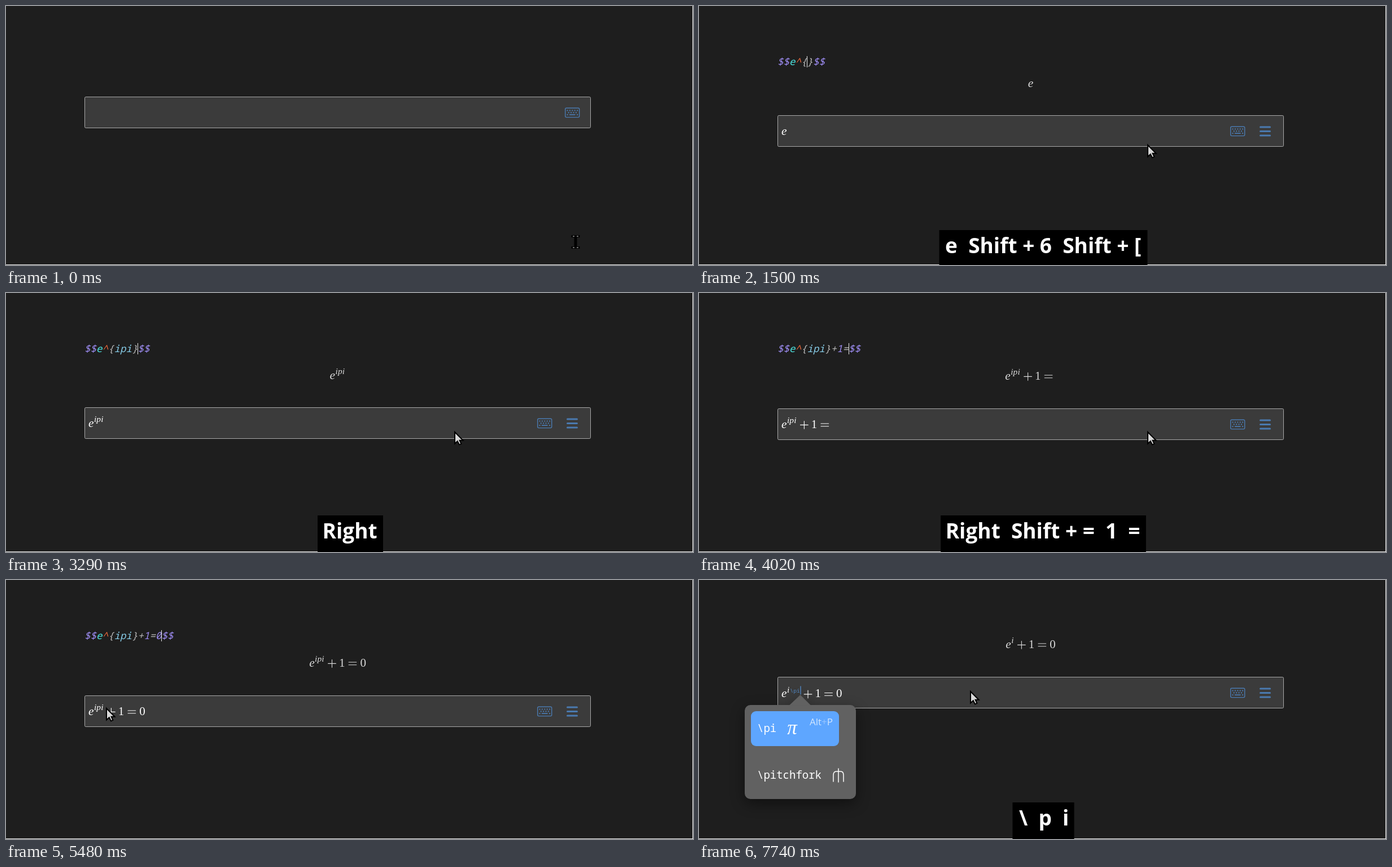
Animation of 1217x460 px, one loop 8000 ms. Source, as an HTML page:

```html
<!DOCTYPE html>
<html lang="en">
<head>
<meta charset="utf-8">
<title>Formula typing</title>
<style>
  html, body { margin: 0; width: 100%; height: 100%; overflow: hidden; background: #1e1e1e; }
  svg { display: block; }
  text { white-space: pre; }
  .mono { font-family: "Noto Sans Mono", "DejaVu Sans Mono", monospace; }
  .src { font-size: 17.5px; font-style: italic; }
  .math { font-family: "Liberation Serif", "Noto Serif", serif; text-anchor: middle; }
  .it { font-style: italic; }
  .keys { font: bold 37px "Open Sans", "Noto Sans", sans-serif; fill: #fff; }
  .hint { font: 17px "Open Sans", "Noto Sans", sans-serif; fill: #d3e7ff; }
</style>
</head>
<body>
<svg width="1217" height="460" viewBox="0 0 1217 460">
  <rect width="1217" height="460" fill="#1e1e1e"/>
  <path d="M1216.5 0V460M0 459.5H1217" stroke="#eee"/>
  <rect id="hover" x="138.5" y="80.5" width="898" height="177" rx="3" fill="none" stroke="#3a3a3a"/>
  <g id="scene"></g>
  <g id="arrow">
    <path d="M0 0V20.5L4.8 16.2L8 22.4L11.4 20.8L8.6 14.8H14.6Z" fill="#d9d9d9" stroke="#000" stroke-width="2"/>
  </g>
  <g id="beam">
    <path d="M-7.500-12H7.500V-8H2.500V8H7.500V12H-7.500V8H-2.500V-8H-7.500Z" fill="#000"/>
    <path d="M-5-10H-2M2-10H5M-5 10H-2M2 10H5" stroke="#ddd" stroke-width="1.2"/>
  </g>
</svg>
<script>
const LOOP = 8000;
const EM = 20.5;
const CELL = 10.5;
const BLUE = '#4a7ab0';
const $ = id => document.getElementById(id);

// [time, changes]; each step keeps what the one before it set
const STEPS = [
  [0, { src: '', cmd: '', open: false, caret: -1, keys: '', popup: false }],
  [700, { open: true, caret: 2 }],
  [900, { src: 'e', caret: 3, keys: 'e' }],
  [1290, { src: 'e^', caret: 4, keys: 'e  Shift + 6' }],
  [1500, { src: 'e^{}', caret: 5, keys: 'e  Shift + 6  Shift + [' }],
  [1700, { caret: 6, keys: 'e  Shift + 6  Shift + [  Shift + ]' }],
  [1830, { caret: 5, keys: 'e  Shift + 6  Shift + [  Shift + ]  Left' }],
  [2030, { src: 'e^{i}', caret: 6, keys: 'Shift + 6  Shift + [  Shift + ]  Left  i' }],
  [2160, { keys: 'Shift + [  Shift + ]  Left  i' }],
  [2290, { src: 'e^{ip}', caret: 7, keys: 'Shift + ]  Left  i  p' }],
  [2420, { src: 'e^{ipi}', caret: 8, keys: 'Left  i  p  i' }],
  [2620, { keys: 'i  p  i' }],
  [2880, { caret: -1, keys: 'p  i' }],
  [2950, { keys: 'i' }],
  [3220, { caret: 9, keys: 'i  Right' }],
  [3290, { keys: 'Right' }],
  [3560, { src: 'e^{ipi}+', caret: 10, keys: 'Right  Shift + =' }],
  [3820, { src: 'e^{ipi}+1', caret: 11, keys: 'Right  Shift + =  1' }],
  [4020, { src: 'e^{ipi}+1=', caret: 12, keys: 'Right  Shift + =  1  =' }],
  [4150, { keys: 'Shift + =  1  =' }],
  [4280, { src: 'e^{ipi}+1=0', caret: 13, keys: 'Shift + =  1  =  0' }],
  [4480, { keys: '1  =  0' }],
  [4750, { keys: '= 0'.replace(' ', '  ') }],
  [4950, { keys: '0' }],
  [5150, { keys: '' }],
  [5550, { open: false }],
  [6320, { src: 'e^{ip}+1=0', keys: 'Backspace' }],
  [6530, { src: 'e^{i}+1=0' }],
  [7060, { cmd: '\\', keys: 'Backspace  \\' }],
  [7460, { keys: '\\' }],
  [7600, { cmd: '\\p', keys: '\\  p' }],
  [7670, { cmd: '\\pi', keys: '\\  p  i' }],
  [7740, { popup: true }]
];
const states = [];
for (const [time, change] of STEPS) states.push({ ...states.at(-1), ...change, time });

// [time, x, y] of the pointer
const MOUSE = [
  [70, 1009, 419], [700, 795, 247], [4749, 795, 247], [4750, 785, 245],
  [5250, 118, 230], [5480, 178, 228], [5620, 178, 228], [6390, 481, 198]
];

const glyph = (ch, x, y, size, color, italic) =>
  `<text class="math ${italic ? 'it' : ''}" x="${x}" y="${y}" font-size="${size}" fill="${color}">${ch}</text>`;

const line = (d, color, width = 1) =>
  `<path d="${d}" stroke="${color}" stroke-width="${width}" fill="none" stroke-linecap="round"/>`;

// Typesets the formula from x; returns markup, width and the end of the exponent
function formula(state, x, y, color, cmd = '') {
  const start = x;
  let out = '';
  if (!state.src) return { out, width: 0, supEnd: x };
  const sup = (state.src.match(/\{(\w*)\}/) || [, ''])[1];
  const tail = state.src.split('}')[1] || '';
  out += glyph('e', x + 0.233 * EM, y, EM + 1, color, true);
  x += 0.466 * EM;
  for (const ch of sup) {
    const w = (ch === 'p' ? 0.503 : 0.345) * 0.707 * EM;
    out += glyph(ch, x + w / 2, y - 8.5, 15.5, color, true);
    x += w;
  }
  if (cmd) {
    out += `<text class="mono" x="${x + 0.8}" y="${y - 8.5}" font-size="9.7" fill="#5288c4">${cmd}</text>`;
    x += cmd.length * 5.82 + 1.5;
  }
  const supEnd = x;
  if (sup) x += 1;
  const axis = y - 0.25 * EM;
  for (const ch of tail) {
    if (ch === '+' || ch === '=') {
      const gap = (ch === '+' ? 0.222 : 0.278) * EM, arm = 0.335 * EM;
      const mid = x + gap + 0.389 * EM;
      const bar = v => `M${mid - arm} ${v}h${2 * arm}`;
      out += line(ch === '+' ? bar(axis) + `M${mid} ${axis - arm}v${2 * arm}`
                             : bar(axis - 2.4) + bar(axis + 2.4), color, 1.1);
      x += 2 * gap + 0.778 * EM;
    } else {
      out += glyph(ch, x + 0.25 * EM, y, EM + 0.5, color);
      x += 0.5 * EM;
    }
  }
  return { out, width: x - start, supEnd };
}

function source(state) {
  const tint = (ch, i) =>
    /[$\d]/.test(ch) ? '#9d8cf2' : ch === '^' ? '#f06a3c' :
    /[{}+=]/.test(ch) ? '#b4b4b4' : i === 2 ? '#4de0dc' : '#86cbe6';
  const spans = [...`$$${state.src}$$`].map((ch, i) => `<tspan fill="${tint(ch, i)}">${ch}</tspan>`);
  let out = `<text class="mono src" x="139" y="105">${spans.join('')}</text>`;
  if (state.caret >= 0) out += `<rect x="${Math.floor(139 + state.caret * CELL)}" y="89" width="1" height="20" fill="#e8e8e8"/>`;
  return out;
}

function keyboard(x, y) {
  let dots = '';
  const dot = (dx, dy) => dots += `<rect x="${x + dx - 1}" y="${y + dy - 1}" width="2" height="2" fill="${BLUE}"/>`;
  for (let i = 0; i < 5; i++) dot(4.5 + i * 4.4, 5);
  for (let i = 0; i < 4; i++) dot(6.7 + i * 4.4, 8.8);
  dot(4.5, 12.6);
  dot(22.1, 12.6);
  return `<rect x="${x + 0.7}" y="${y + 0.7}" width="25" height="16.400" rx="2" fill="none" stroke="${BLUE}" stroke-width="1.4"/>`
    + dots + line(`M${x + 8.5} ${y + 12.6}h9.500`, BLUE, 1.6);
}

function field(state, top) {
  let out = `<rect x="139.5" y="${top}" width="896" height="55" rx="2" fill="#3b3b3b" stroke="#a9a9a9"/>`;
  const filled = state.src !== '';
  out += keyboard(filled ? 941 : 990, top + 19);
  if (filled) for (const dy of [20.5, 28, 35.5]) out += line(`M994.5 ${top + dy}h17`, BLUE, 3);
  const base = top + (state.cmd ? 35.500 : 34);
  const f = formula(state, 146, base, '#fff', state.cmd);
  out += f.out;
  if (filled && !state.open) {
    const cx = f.supEnd + 0.5;
    out += state.cmd ? line(`M${cx} ${base - 19}v14`, '#5288c4', 1.4)
                     : line(`M${cx} ${base - 18}v9`, '#a8a8a8', 1.4);
  }
  return out;
}

function popup() {
  return `<g style="filter:drop-shadow(0 8px 12px rgba(0,0,0,.45))">
    <rect x="81" y="222" width="197" height="167" rx="10" fill="#616161"/>
    <path d="M160 222.500L179.500 204L198 222.500Z" fill="#616161"/></g>
    <rect x="92" y="233" width="156" height="62" rx="9" fill="#5ea6ff"/>
    <g class="mono" font-size="19" fill="#fff">
      <text x="103" y="270">\\pi</text><text x="103" y="353">\\pitchfork</text></g>
    ${glyph('π', 165, 274, 35, '#fff', true)}
    <text class="hint" x="196" y="258">Alt<tspan fill="#97c5ff">+</tspan>P</text>
    ${line('M238 358V347Q238 340 243 340H251Q256 340 256 347V358M247 335V359', '#fff', 1.5)}`;
}

const pen = document.createElement('canvas').getContext('2d');

// The black panel hugs the ink of its text
function keyPanel(keys) {
  if (!keys) return '';
  const label = keys.replace(/ /g, '\u00a0');
  pen.font = 'bold 37px "Open Sans", "Noto Sans", sans-serif';
  const m = pen.measureText(label);
  const width = m.actualBoundingBoxLeft + m.actualBoundingBoxRight + 23;
  const left = 610 - width / 2;
  const base = 445 - m.actualBoundingBoxDescent;
  const top = base - m.actualBoundingBoxAscent - 12;
  return `<rect x="${left}" y="${top}" width="${width}" height="${460 - top}"/>
    <text class="keys" x="${left + 11.5 + m.actualBoundingBoxLeft}" y="${base}">${label}</text>`;
}

function scene(state) {
  const raised = /\{\w/.test(state.src), tail = /\}./.test(state.src);
  const shift = state.open ? 33 : 0;
  let grow = tail ? 11 : raised ? 9 : state.src === 'e^' ? 3 : 0;
  if (state.open && !state.src) grow = -9;
  const base = 111 + shift + (tail ? 9.500 : raised ? 8.500 : 0);
  const { width } = formula(state, 0, 0, '');
  return (state.open ? source(state) : '')
    + formula(state, 587.5 - width / 2, base, '#dadada').out
    + field(state, 161.5 + shift + grow)
    + (state.popup ? popup() : '')
    + keyPanel(state.keys);
}

function pointer(t) {
  const i = MOUSE.findIndex(k => k[0] > t);
  if (i === 0) return MOUSE[0].slice(1);
  if (i < 0) return MOUSE.at(-1).slice(1);
  const [t0, x0, y0] = MOUSE[i - 1], [t1, x1, y1] = MOUSE[i];
  const p = (t - t0) / (t1 - t0), e = p * p * (3 - 2 * p);
  return [x0 + (x1 - x0) * e, y0 + (y1 - y0) * e];
}

let shown = null;
const begin = performance.now();

function frame() {
  const t = (performance.now() - begin) % LOOP;
  const state = states.findLast(s => s.time <= t);
  if (state !== shown) {
    $('scene').innerHTML = scene(state);
    shown = state;
  }
  const [x, y] = pointer(t);
  const beam = y > 258 || x < 139;
  for (const id of ['arrow', 'beam']) {
    $(id).setAttribute('transform', `translate(${x} ${y})`);
    $(id).style.display = (id === 'beam') === beam ? '' : 'none';
  }
  $('hover').style.display = !beam && t < 700 ? '' : 'none';
  requestAnimationFrame(frame);
}
frame();
</script>
</body>
</html>
```
